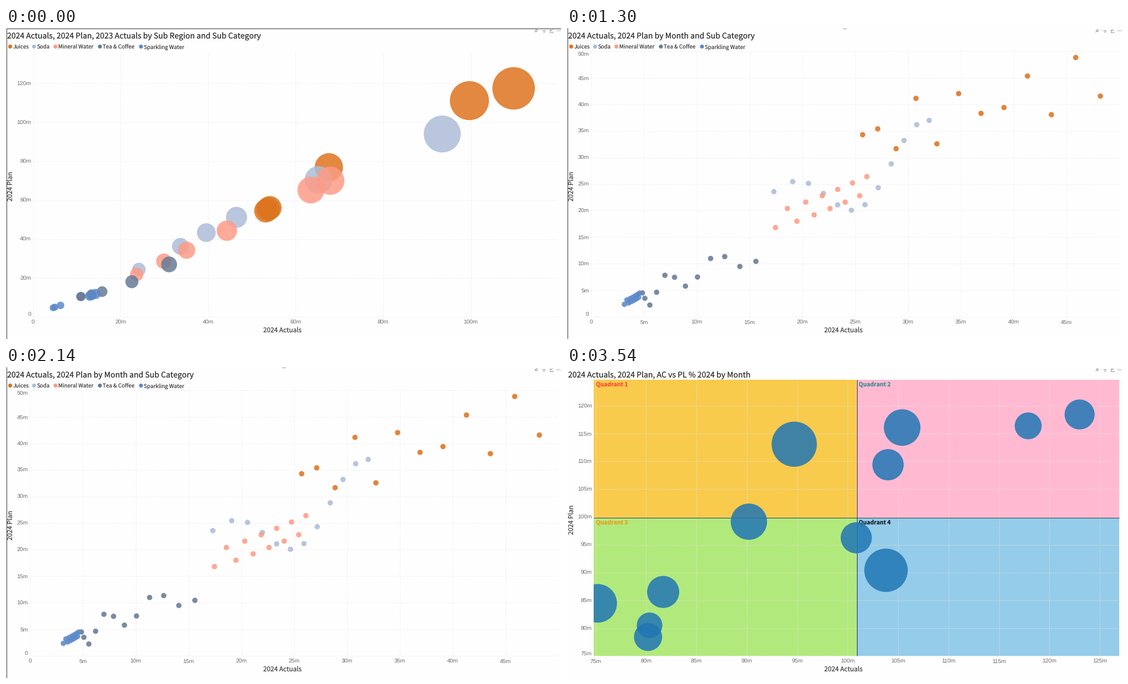
A matplotlib script for the animation above (4.1 s loop, 999 by 561 pixels).

```python
import numpy as np
import matplotlib.pyplot as plt
from matplotlib.animation import FuncAnimation
from matplotlib.patches import Circle, Rectangle

W, H, DPI = 999, 561, 100
STEP = 100                      # ms per frame
CUTS = (1300, 2700)             # hard changes between charts
LOOP = 4100

UI = "Noto Sans CJK JP"
TICK = "Liberation Sans"
INK, SOFT, MUTED = "#2d2c2b", "#454341", "#6e6c6a"
GRID, EDGE = "#e9e9e9", "#3c3c3c"
RIGHT, BOTTOM = 994, 521
COLORS = {
    "Juices": "#dd741f",
    "Soda": "#adbcd8",
    "Mineral Water": "#fd9c86",
    "Tea & Coffee": "#687a96",
    "Sparkling Water": "#5b89c9",
}
LEGEND_X = (7.5, 50.5, 89, 169, 243)

plt.rcParams["text.hinting"] = "none"
plt.rcParams["toolbar"] = "None"
fig = plt.figure(figsize=(W / DPI, H / DPI), dpi=DPI, facecolor="#fefefe")


def px(n):
    """Pixels to points."""
    return n * 72 / DPI


def stage():
    ax = fig.add_axes([0, 0, 1, 1])
    ax.set_xlim(0, W)
    ax.set_ylim(H, 0)
    ax.axis("off")
    return ax


def text(ax, x, y, s, size, color=INK, font=UI, **kw):
    ax.text(x, y, s, fontsize=px(size), color=color, family=font,
            va="baseline", **kw)


def line(ax, xs, ys, color, width=1, **kw):
    ax.plot(xs, ys, color=color, lw=px(width), solid_capstyle="butt", **kw)


def dot(ax, x, y, r, color, alpha=0.85):
    patch = Circle((x, y), r, fc=color, ec="none", alpha=alpha, zorder=5)
    ax.add_patch(patch)
    return patch


def icons(ax):
    def stroke(xs, ys):
        line(ax, xs, ys, "#858585", 0.8)

    # pin
    stroke([951.5, 954], [7.5, 5])
    stroke([952.5, 955, 957, 955, 952.5], [4.5, 2.5, 4.5, 7, 4.5])
    # filter
    for i in range(3):
        stroke([964.5 + i, 970.5 - i], [3.5 + 2 * i] * 2)
    # focus
    stroke([981, 978.5, 978.5, 984, 984], [3, 3, 8, 8, 5.5])
    stroke([980.5, 984], [6, 2.5])
    # more
    for i in range(3):
        dot(ax, 992 + 2.5 * i, 5, 0.65, "#666666", 1)


def header(ax, title, plan_y):
    text(ax, 2, 18.3, title, 14)
    text(ax, 498, 549, "2024 Actuals", 11.8, SOFT, ha="center")
    text(ax, 12, plan_y, "2024 Plan", 11.8, SOFT, ha="center", rotation=90,
         rotation_mode="anchor")
    icons(ax)


def legend(ax):
    for x, (name, color) in zip(LEGEND_X, COLORS.items()):
        dot(ax, x, 33.5, 3.6, color, 1)
        text(ax, x + 5, 37.2, name, 9.8, SOFT)


def label(v):
    return f"{v}m" if v else "0"


def grid(ax, left, top, start, step, nx, ny, x0, dx, dy, color=GRID):
    """Draw ticks and return the map from values to pixels."""
    dots = dict(linestyle=(0, (1.5, 2)), color=color, zorder=2)
    for i in range(nx):
        x = x0 + i * dx
        line(ax, [x, x], [top, BOTTOM], **dots)
        text(ax, x, 533.5, label(start + i * step), 10.4, MUTED, TICK,
             ha="center")
    for i in range(ny):
        y = BOTTOM - i * dy
        line(ax, [left, RIGHT], [y, y], **dots)
        text(ax, left - 3.2, np.clip(y, top + 5, 516) + 3.7,
             label(start + i * step), 10.4, MUTED, TICK, ha="right")

    def at(actual, plan):
        return (x0 + (actual - start) / step * dx,
                BOTTOM - (plan - start) / step * dy)
    return at


def regions():
    ax = stage()
    header(ax, "2024 Actuals, 2024 Plan, 2023 Actuals by Sub Region "
               "and Sub Category", 285)
    legend(ax)
    at = grid(ax, 48.5, 42, 0, 20, 6, 7, 48.5, 157.6, 70.15)
    # actuals per sub region, and the curve their plan follows
    groups = (
        ((109.8, 99.7, 67.6, 54.1, 53.7, 53.2), (-0.0105, 2.824, -66)),
        ((93.5, 65.2, 46.5, 39.6, 33.7, 24.2), (-0.0042, 1.5, -9.5)),
        ((67.9, 63.5, 44.3, 35.1, 29.9, 23.7), (0, 1.09, -4)),
        ((31.1, 22.6, 15.8, 13.4, 11, 10.9), (0.0195, 0, 8.1)),
        ((14.3, 13.4, 13, 6.3, 5, 4.6), (0, 0.73, 1.3)),
    )
    for color, (actuals, curve) in zip(COLORS.values(), groups):
        for v in actuals:
            dot(ax, *at(v, np.polyval(curve, v)), 4.8 + 0.305 * v, color)
    line(ax, [0.5, 998.5, 998.5, 0.5, 0.5], [0.5, 0.5, 560.5, 560.5, 0.5],
         EDGE)
    return ax


def months():
    ax = stage()
    header(ax, "2024 Actuals, 2024 Plan by Month and Sub Category", 285)
    legend(ax)
    at = grid(ax, 43, 42, 0, 5, 10, 11, 43.3, 95.1, 47.9)
    # low, high and bend of actuals; base, slope and ripple of the plan
    groups = (
        (25.7, 48.2, 1.15, 33, 1.1, 5, 7 * np.pi / 6, 1.31),
        (17.3, 32, 0.88, 19, 1.2, 5.3, 0.66, -0.53),
        (17.45, 26.1, 0.85, 18.3, 0.6, 1.5, np.pi, np.pi),
        (4.86, 15.6, 1.6, 2.5, 0.85, 2, 1.5, 0),
        (3.15, 4.6, 0.75, 2.7, 0.13, 0.35, np.pi, np.pi),
    )
    i = np.arange(12)
    for color, group in zip(COLORS.values(), groups):
        low, high, bend, base, slope, amp, freq, phase = group
        actual = low + (high - low) * (i / 11) ** bend
        plan = base + slope * i + amp * np.cos(freq * i + phase)
        for x, y in zip(*at(actual, plan)):
            dot(ax, x, y, 4.8, color, 0.88)
    line(ax, [496, 503], [0.5, 0.5], "#a0a0a0")
    for x in (0.5, 998.5):
        line(ax, [x, x], [0, H], EDGE)
    return ax


def quadrants():
    ax = stage()
    header(ax, "2024 Actuals, 2024 Plan, AC vs PL % 2024 by Month", 275.5)
    left, top, mx, my = 48, 23, 521, 271.7
    cells = (
        (left, top, mx, my, "#f8cb4c", "#f94a3c"),
        (mx, top, RIGHT, my, "#ffbad2", "#3b8c95"),
        (left, my, mx, BOTTOM, "#b2e97c", "#f39a1c"),
        (mx, my, RIGHT, BOTTOM, "#95ccea", "#17212b"),
    )
    for i, (x0, y0, x1, y1, fill, ink) in enumerate(cells, 1):
        ax.add_patch(Rectangle((x0, y0), x1 - x0, y1 - y0, fc=fill, ec="none"))
        text(ax, x0 + 4, y0 + 11.8, f"Quadrant {i}", 10.4, ink, weight="bold",
             zorder=4)
    at = grid(ax, left, top, 75, 5, 11, 10, 51.5, 90.75, 50.1, "#e4e6e2")
    line(ax, [mx + 0.5] * 2, [top, BOTTOM], "#30363a", zorder=3)
    line(ax, [left, RIGHT], [my, my], "#30363a", zorder=3)
    area = Rectangle((left, top), RIGHT - left, BOTTOM - top,
                     transform=ax.transData)
    for actual, plan in (
        (94.7, 113.1), (90.2, 99.15), (105.4, 116.1), (104, 109.4),
        (117.9, 116.4), (123, 118.45), (100.85, 96.25), (103.8, 90.4),
        (75.2, 84.45), (81.7, 86.5), (80.35, 80.5), (80.2, 78.4),
    ):
        # size shows how far actuals are off plan, in percent
        gap = abs(actual / plan - 1) * 100
        bubble = dot(ax, *at(actual, plan), 22.8 + 1.1 * gap, "#2076b4")
        bubble.set_clip_path(area)
    line(ax, [0, W], [560.5, 560.5], "#9a9a9a")
    return ax


scenes = [regions(), months(), quadrants()]


def draw(frame):
    current = sum(frame * STEP >= cut for cut in CUTS)
    for i, ax in enumerate(scenes):
        ax.set_visible(i == current)
    return scenes


anim = FuncAnimation(fig, draw, frames=LOOP // STEP, interval=STEP,
                     repeat=True, repeat_delay=0, blit=False)
plt.show()
```
